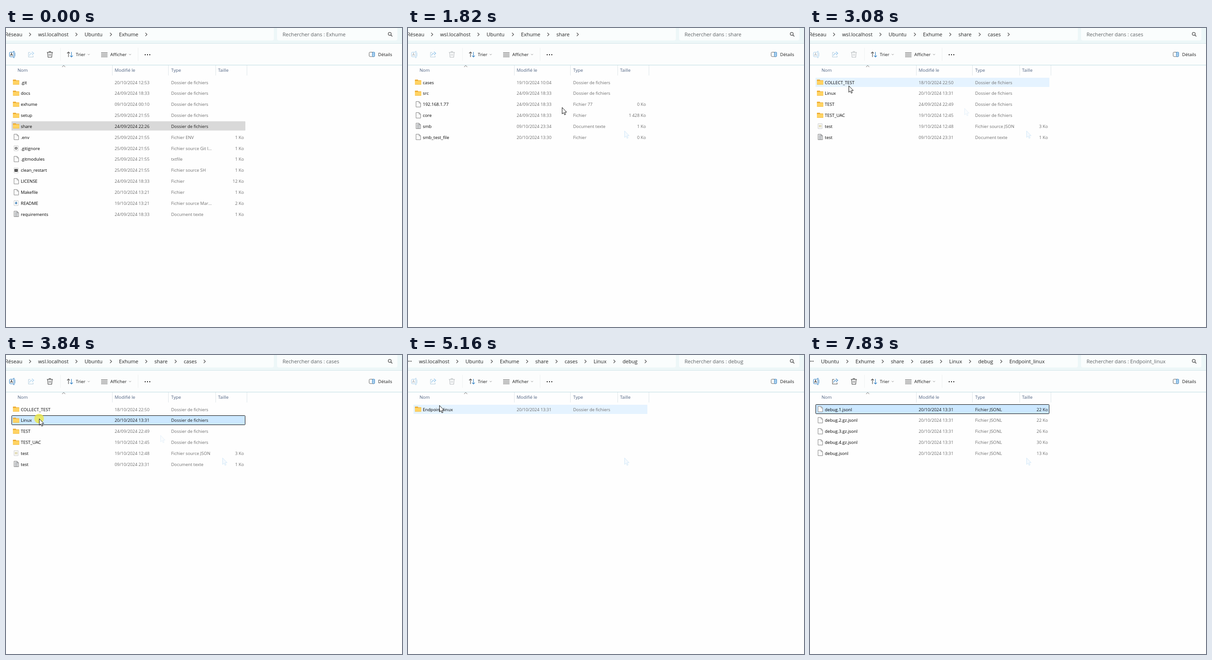
An HTML page with a canvas for the animation above (8 s loop, 862 by 649 pixels).

```html
<!DOCTYPE html>
<html lang="fr">
<head>
<meta charset="utf-8">
<style>
html, body { margin: 0; width: 100%; height: 100%; overflow: hidden; background: #fff; }
canvas { display: block; }
</style>
</head>
<body>
<canvas id="stage" width="862" height="649"></canvas>
<script>
const c = document.getElementById('stage').getContext('2d');
const LOOP = 8000, GREY = '#6e6e6e', INK = '#1b1b1b';

// Each row: icon | name | date | type | size
const DIR = 'Dossier de fichiers';
const screens = [
  { name: 'Exhume', at: 0, sel: 4, click: 700, tools: 0, depth: 4, shift: 0, rows: [
    'dir|.git|20/10/2024 12:53', 'dir|docs|24/09/2024 18:33', 'dir|exhume|09/10/2024 00:10',
    'dir|setup|25/09/2024 21:55', 'dir|share|24/09/2024 22:26',
    'file|.env|25/09/2024 21:55|Fichier ENV|1 Ko',
    'gear|.gitignore|25/09/2024 21:55|Fichier source Git I...|1 Ko',
    'file|.gitmodules|25/09/2024 21:55|txtfile|1 Ko',
    'shell|clean_restart|25/09/2024 21:55|Fichier source SH|1 Ko',
    'file|LICENSE|24/09/2024 18:33|Fichier|12 Ko',
    'file|Makefile|20/10/2024 13:21|Fichier|1 Ko',
    'mark|README|19/10/2024 13:21|Fichier source Mar...|2 Ko',
    'text|requirements|24/09/2024 18:33|Document texte|1 Ko'] },
  { name: 'share', at: 1600, sel: 0, click: 2230, tools: 2290, depth: 5, shift: 0, rows: [
    'dir|cases|19/10/2024 10:04', 'dir|src|24/09/2024 18:33',
    'file|192.168.1.77|24/09/2024 18:33|Fichier 77|0 Ko',
    'file|core|24/09/2024 18:33|Fichier|1\u2009428 Ko',
    'text|smb|09/10/2024 23:34|Document texte|1 Ko',
    'file|smb_test_file|20/10/2024 13:30|Fichier|0 Ko'] },
  { name: 'cases', at: 2700, sel: 1, click: 3480, tools: 3780, depth: 6, shift: 0, rows: [
    'dir|COLLECT_TEST|18/10/2024 22:50', 'dir|Linux|20/10/2024 13:31',
    'dir|TEST|24/09/2024 22:49', 'dir|TEST_UAC|19/10/2024 12:45',
    'json|test|19/10/2024 12:48|Fichier source JSON|3 Ko',
    'text|test|09/10/2024 23:31|Document texte|1 Ko'] },
  { name: 'Linux', at: 3950, sel: 0, click: 4520, tools: 4640, depth: 7, shift: 0, rows: [
    'dir|debug|20/10/2024 13:34', 'dir|extract_uac|25/09/2024 23:29',
    'dir|ic_hosts|13/10/2024 13:30', 'dir|postgresql|26/09/2024 00:14',
    'dir|utmp|09/10/2024 22:09'] },
  { name: 'debug', at: 4900, sel: 0, click: 6060, tools: 6120, depth: 8, shift: 46, rows: [
    'dir|Endpoint_linux|20/10/2024 13:31'] },
  { name: 'Endpoint_linux', at: 6500, sel: 0, click: 7240, tools: 7300, depth: 9, shift: 147, rows: [
    'file|debug.1.jsonl|20/10/2024 13:31|Fichier JSONL|22 Ko',
    'file|debug.2.gz.jsonl|20/10/2024 13:31|Fichier JSONL|22 Ko',
    'file|debug.3.gz.jsonl|20/10/2024 13:31|Fichier JSONL|26 Ko',
    'file|debug.4.gz.jsonl|20/10/2024 13:31|Fichier JSONL|30 Ko',
    'file|debug.jsonl|20/10/2024 13:31|Fichier JSONL|13 Ko'] }
];
const crumbs = [['Réseau', -2], ['wsl.localhost', 70], ['Ubuntu', 171], ['Exhume', 246], ['share', 323],
  ['cases', 387], ['Linux', 450], ['debug', 513], ['Endpoint_linux', 581], ['', 660]];
const presses = [[700, 790], [1170, 1270], [2230, 2330], [2480, 2570], [3480, 3580], [3780, 3870],
  [4520, 4640], [4790, 4870], [6060, 6180], [6370, 6440], [7240, 7330]];
const path = [[30, 858, 640], [400, 640, 330], [600, 471, 224], [700, 431, 217], [1640, 431, 217],
  [1820, 336, 172], [1970, 120, 114], [2030, 118, 112], [2760, 118, 112], [3080, 84, 125],
  [3280, 72, 138], [4000, 72, 138], [4290, 65, 121], [4900, 65, 121], [5160, 68, 109],
  [5650, 68, 109], [5750, 68, 112], [7560, 68, 112], [7830, 864, 143]];

const rowY = i => 118 + 23.85 * i;

function text(s, x, y, size, color, align = 'left') {
  c.font = size + 'px "Open Sans", "Noto Sans", sans-serif';
  c.textAlign = align;
  c.fillStyle = color;
  c.fillText(s, x, y);
}
function rect(x, y, w, h, color) {
  c.fillStyle = color;
  c.fillRect(x, y, w, h);
}
function box(x, y, w, h, r, fill, stroke, width = 1) {
  c.beginPath();
  c.roundRect(x, y, w, h, r);
  if (fill) { c.fillStyle = fill; c.fill(); }
  if (stroke) { c.strokeStyle = stroke; c.lineWidth = width; c.stroke(); }
}
function line(color, width, ...p) {
  c.beginPath();
  for (let i = 0; i < p.length; i += 2) c.lineTo(p[i], p[i + 1]);
  c.strokeStyle = color;
  c.lineWidth = width;
  c.stroke();
}
function shape(fill, ...p) {
  c.beginPath();
  for (let i = 0; i < p.length; i += 2) c.lineTo(p[i], p[i + 1]);
  c.closePath();
  c.fillStyle = fill;
  c.fill();
}
function dot(x, y, r, color) {
  c.beginPath();
  c.arc(x, y, r, 0, 7);
  c.fillStyle = color;
  c.fill();
}
function ring(x, y, r, color, width = 1) {
  c.beginPath();
  c.arc(x, y, r, 0, 7);
  c.strokeStyle = color;
  c.lineWidth = width;
  c.stroke();
}
const caret = (x, y, w, h, color) => line(color, 1, x - w, y - h, x, y + h, x + w, y - h);

function icon(kind, y) {
  if (kind === 'dir') {
    box(15, y - 6, 7, 5, 1, '#e9a52c');
    box(15, y - 4.5, 14, 9.5, 1, '#f3b73f');
    box(15, y - 3, 14, 8, 1, '#ffd363');
    rect(15.5, y + 4, 13, 1, '#f2bd45');
    return;
  }
  if (kind === 'file' || kind === 'text') {
    c.beginPath();
    [[17.5, -6.5], [24, -6.5], [27.5, -3], [27.5, 5.5], [17.5, 5.5]].forEach(p => c.lineTo(p[0], y + p[1]));
    c.closePath();
    c.fillStyle = '#fdfdfd';
    c.fill();
    c.strokeStyle = '#868686';
    c.lineWidth = 1;
    c.stroke();
    line('#868686', 1, 24, y - 6.5, 24, y - 3, 27.5, y - 3);
    if (kind === 'text') for (let k = -4; k < 5; k += 2) line('#8b8f94', 1, 19, y + k, 26, y + k);
    return;
  }
  box(17.5, y - 5.5, 9, 11, 0.5, '#fafafa', '#cfcfcf');
  if (kind === 'gear') ring(22, y, 2, '#555', 1.6);
  if (kind === 'shell') {
    rect(18.5, y - 3, 7, 6, '#3a3a3a');
    line('#ddd', 0.8, 20, y - 0.5, 24, y - 0.5);
  }
  if (kind === 'mark') {
    rect(21, y - 3, 2, 3, '#3d7fb8');
    shape('#3d7fb8', 19, y - 0.5, 25, y - 0.5, 22, y + 3);
  }
  if (kind === 'json') {
    line('#b8a648', 1, 20.5, y - 2.5, 20.5, y + 2.5);
    line('#b8a648', 1, 23.5, y - 2.5, 23.5, y + 2.5);
  }
}

function topBar(s) {
  rect(0, 0, 862, 34, '#edf7f8');
  box(-10, -6, 593, 33, 4, '#fafdfd');
  box(590, -6, 262, 33, 4, '#fafdfd');
  const end = s.name === 'Endpoint_linux';
  for (let i = 0; i < s.depth; i++) {
    const x = crumbs[i][1] - s.shift;
    if (s.shift && x < 20) continue;
    text(crumbs[i][0], x, 18, 11.08, '#222');
    if (end && i === s.depth - 1) continue;
    const a = crumbs[i + 1][1] - s.shift - 18;
    line('#444', 1.1, a - 1.5, 10.5, a + 2, 14, a - 1.5, 17.5);
  }
  if (s.shift) for (let k = 0; k < 3; k++) dot(1 + 3 * k, 13.5, 0.9, '#222');
  text('Rechercher dans : ' + s.name, 602, 18, 11.08, '#5c6063');
  ring(835.3, 12.7, 3.2, '#333', 1.1);
  line('#333', 1.2, 837.6, 15, 841, 18.4);
}

function toolBar(s, t) {
  rect(0, 34, 862, 46, '#fcfdfd');
  rect(0, 33, 862, 1, '#d3e5e9');
  rect(0, 80, 862, 1, '#bfdde4');
  const on = t >= s.tools, file = s.shift === 147 && on;
  const ink = on ? '#444' : '#b9bdc0', blue = on ? '#2f7fc4' : '#a9cfec';

  box(7.5, 52.5, 12, 10, 2, null, blue);
  line(ink, 1.1, 9.5, 60.5, 12, 54.5, 14.5, 60.5);
  line(ink, 1, 10.4, 58.6, 13.6, 58.6);
  rect(15.5, 51, 3, 13, '#fcfdfd');
  line(blue, 1.1, 17, 51, 17, 64);
  line(blue, 1, 15.5, 50.7, 18.5, 50.7);
  line(blue, 1, 15.5, 64.3, 18.5, 64.3);

  const edge = file ? '#555' : '#b4cede', arrow = file ? '#2f7fc4' : on ? '#a6d0ef' : '#85bde8';
  line(edge, 1.1, 53, 53, 49, 53, 49, 63, 59, 63, 59, 60);
  c.beginPath();
  c.moveTo(51.5, 60);
  c.quadraticCurveTo(52, 55, 57, 55);
  c.strokeStyle = arrow;
  c.lineWidth = 1.1;
  c.stroke();
  line(arrow, 1.1, 56.5, 51.5, 60.5, 55, 56.5, 58.5);

  line(ink, 1.1, 89, 53, 102, 53);
  line(ink, 1.1, 93.5, 53, 94, 51, 97, 51, 97.5, 53);
  line(ink, 1.1, 90.5, 53, 91.5, 63.5, 99.5, 63.5, 100.5, 53);
  line(ink, 1, 94, 56, 94, 60.5);
  line(ink, 1, 97, 56, 97, 60.5);

  rect(118, 43, 1, 28, '#eef1f2');
  rect(287, 43, 1, 28, '#eef1f2');
  line('#444', 1.1, 136, 63, 136, 52);
  line('#444', 1.1, 133, 55, 136, 52, 139, 55);
  line('#2f7fc4', 1.1, 142.5, 52, 142.5, 63);
  line('#2f7fc4', 1.1, 139.5, 60, 142.5, 63, 145.5, 60);
  text('Trier', 152, 61, 9.7, INK);
  caret(180, 57.5, 2, 1, '#888');
  for (let k = 0; k < 4; k++) rect(207, 53 + 3 * k, 14, 1, '#555');
  text('Afficher', 227, 61, 9.8, INK);
  caret(270, 57.5, 2, 1, '#888');
  for (let k = 0; k < 3; k++) dot(303 + 5 * k, 58, 1.2, '#222');

  box(790.5, 52.5, 12, 9.5, 2, null, '#666');
  box(797.5, 52.5, 5, 9.5, 1.5, '#c9e4f8', '#2f7fc4');
  line('#2f7fc4', 1, 799, 55.5, 801, 55.5);
  line('#2f7fc4', 1, 799, 58.5, 801, 58.5);
  text('Détails', 810, 61, 9.6, INK);
}

function columns() {
  [231, 353, 456, 524].forEach(x => rect(x, 81, 1, 22, '#dfe6e9'));
  [['Nom', 25], ['Modifié le', 236.5], ['Type', 359.5], ['Taille', 461.5]]
    .forEach(h => text(h[0], h[1], 95.4, 9.75, '#4d6180'));
  caret(125.5, 83, 3.5, -1.6, '#666');
}

function list(s, t, pos) {
  s.rows.forEach((r, i) => {
    const [kind, name, date, type = DIR, size = ''] = r.split('|');
    const y = rowY(i), picked = i === s.sel && t >= s.click;
    const settled = picked && t >= s.click + 120;
    const idle = s.at === 0 && i === s.sel && !picked;
    const over = pos && t - s.at > 250 && pos[0] > 12 && pos[0] < 521 && Math.abs(pos[1] - y) < 10;
    if (picked) box(12.5, Math.round(y - 10) - 0.5, 508, 20, 1, settled ? '#cce8ff' : '#d9eefe', '#111');
    else if (idle) box(12, Math.round(y - 10) - 0.5, 509, 20, 1, '#d9d9d9');
    else if (over) rect(12, Math.round(y - 10), 509, 20, '#e5f3ff');
    const ink = settled || idle ? INK : GREY, b = y + 3.5;
    icon(kind, Math.round(y));
    text(name, 32.3, b, 9.45, '#000');
    text(date, 236.5, b, 9.33, ink);
    text(type, 359.5, b, 9.42, ink);
    text(size, 518, b, 9.42, ink, 'right');
  });
}

function pointer(x, y, fill, stroke) {
  c.beginPath();
  [[0, 0], [0, 14], [3.2, 11.2], [5.4, 16], [7.6, 15], [5.5, 10.4], [9.8, 10.2]]
    .forEach(p => c.lineTo(x + 0.5 + p[0], y + 0.5 + p[1]));
  c.closePath();
  c.fillStyle = fill;
  c.fill();
  c.strokeStyle = stroke;
  c.lineWidth = 1;
  c.stroke();
}

const still = i => {
  const a = path[i], b = path[i + 1];
  return !a || !b || (a[1] === b[1] && a[2] === b[2]);
};

// Ease only where a leg meets a pause.
function cursor(t) {
  const i = path.findIndex((p, k) => k + 1 < path.length && t >= p[0] && t < path[k + 1][0]);
  if (i < 0) return null;
  const a = path[i], b = path[i + 1], u = (t - a[0]) / (b[0] - a[0]);
  const m0 = still(i - 1) ? 0 : 1, m1 = still(i + 1) ? 0 : 1;
  const e = m0 * (u ** 3 - 2 * u * u + u) + 3 * u * u - 2 * u ** 3 + m1 * (u ** 3 - u * u);
  return [a[1] + (b[1] - a[1]) * e, a[2] + (b[2] - a[2]) * e];
}

function draw(t) {
  const s = screens.filter(v => t >= v.at).pop(), pos = t > 30 ? cursor(t) : null;
  rect(0, 0, 862, 649, '#fefefe');
  topBar(s);
  toolBar(s, t);
  columns();
  list(s, t, pos);
  if (t > 640) pointer(471, 223, '#f5fafe', '#d3e8f8');
  if (t > 1890 && t < 4900) pointer(336, 174, '#fafcfe', '#e6f1fa');
  if (!pos) return;
  if (presses.some(p => t >= p[0] && t < p[1])) dot(pos[0], pos[1], 10.5, 'rgba(236,232,76,0.82)');
  pointer(Math.round(pos[0]), Math.round(pos[1]), '#fff', '#111');
}

const start = performance.now();
function tick() {
  draw((performance.now() - start) % LOOP);
  requestAnimationFrame(tick);
}
tick();
</script>
</body>
</html>
```
